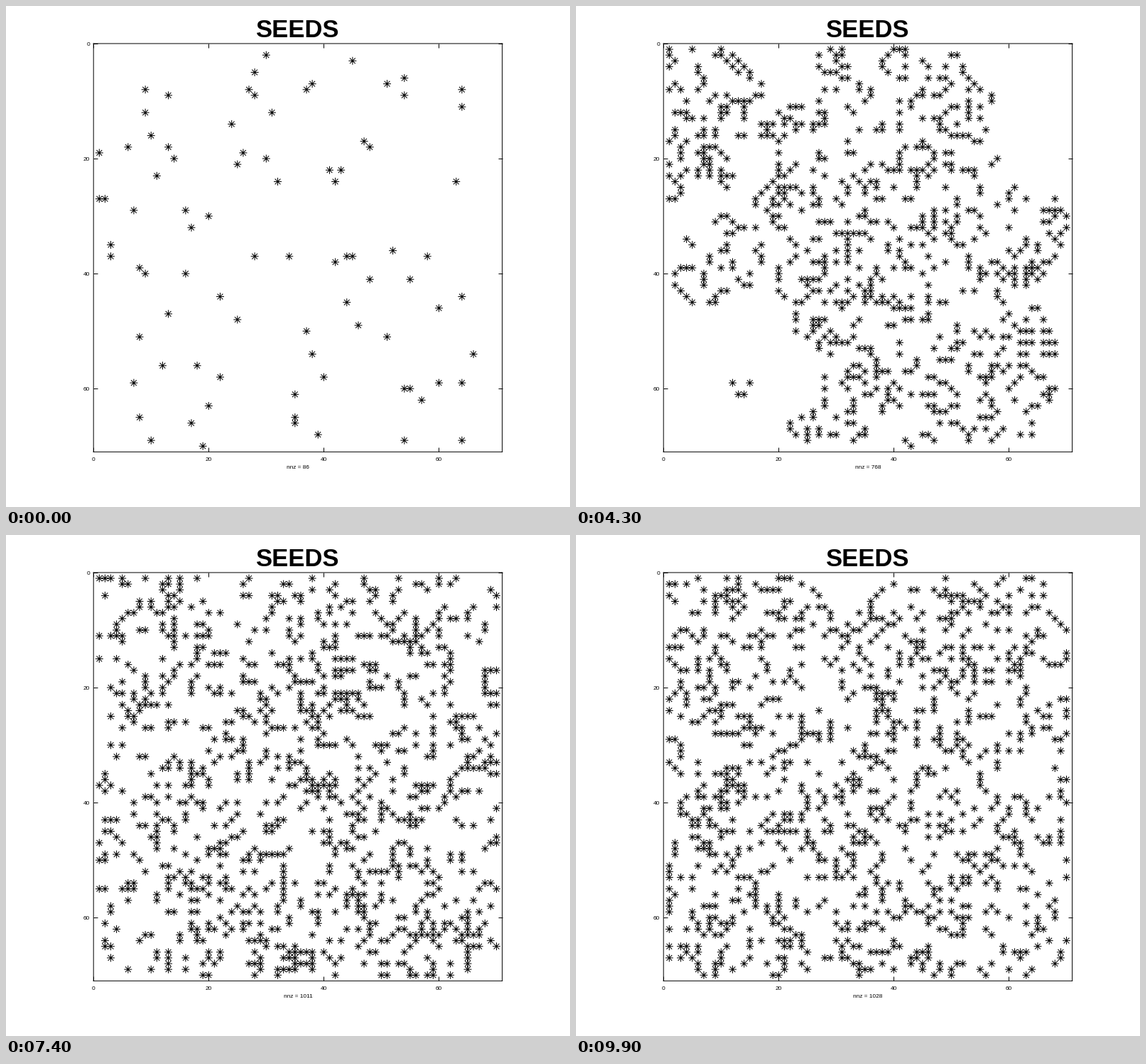
A matplotlib script for the animation above (10000 ms loop, 794 px wide and 706 px high).

```python
import random

import matplotlib.pyplot as plt
import numpy as np
from matplotlib.animation import FuncAnimation

W, H, DPI = 794, 706, 64
N, STEPS, ALIVE = 70, 100, 86

# Square plot box inside the usual 0.13-0.905 by 0.11-0.925 axes area.
SIDE = 0.815 * H
LEFT, TOP = 0.5175 * W - SIDE / 2, 0.075 * H
CELL = SIDE / (N + 1)

# Close groups (column, row) that start the growth; lone cells just die out.
GROUPS = [
    (38, 7), (37, 8), (27, 8), (28, 9), (47, 17), (48, 18), (13, 18), (14, 20),
    (26, 19), (25, 21), (41, 22), (43, 22), (42, 24), (1, 27), (2, 27),
    (3, 35), (3, 37), (44, 37), (45, 37), (42, 38), (8, 39), (9, 40),
    (54, 60), (55, 60), (57, 62), (35, 65), (35, 66),
]


def px(v):
    """Pixels to points."""
    return v * 72 / DPI


def first_board():
    """The groups plus random lone cells, too far apart to interact."""
    rng = random.Random(7)
    cells = list(GROUPS)
    while len(cells) < ALIVE:
        c, r = rng.randint(1, N), rng.randint(1, N)
        if all(max(abs(c - a), abs(r - b)) > 2 for a, b in cells):
            cells.append((c, r))
    board = np.zeros((N, N), int)
    for c, r in cells:
        board[r - 1, c - 1] = 1
    return board


def step(board):
    """Seeds rule: a dead cell with exactly two neighbours is born, all others die."""
    p = np.pad(board, 1)
    near = sum(p[i:i + N, j:j + N] for i in range(3) for j in range(3)) - board
    return ((board == 0) & (near == 2)).astype(int)


boards = [first_board()]
while len(boards) < STEPS:
    boards.append(step(boards[-1]))

plt.rcParams.update({"font.family": "Liberation Sans", "path.simplify": False})
fig = plt.figure(figsize=(W / DPI, H / DPI), dpi=DPI, facecolor="white")


def label(x, y, text, size=8.3, ha="center", **kw):
    return fig.text(x / W, 1 - y / H, text, fontsize=px(size), ha=ha,
                    va="baseline", color="black", **kw)


ax = fig.add_axes([LEFT / W, 1 - (TOP + SIDE) / H, SIDE / W, SIDE / H])
ax.set(xlim=(0, N + 1), ylim=(N + 1, 0))
ticks = range(0, N, 20)
ax.set_xticks(ticks)
ax.set_yticks(ticks)
ax.tick_params(direction="in", length=px(6), width=px(1), top=True, right=True,
               labelleft=False, labelbottom=False)
for spine in ax.spines.values():
    spine.set_linewidth(px(1))
    spine.set_snap(False)

for t in ticks:
    label(LEFT + t * CELL, 641, str(t))
    label(LEFT - 5, TOP + t * CELL + 3, str(t), ha="right")

label(LEFT + SIDE / 2, 44, "SEEDS", size=34.6, weight="bold")
count = label(LEFT + SIDE / 2, 652, "")

# Asterisk: four strokes through the centre, separated by gaps.
angles = np.arange(4) * np.pi / 4
arm = 5.5 / CELL * np.column_stack([np.cos(angles), np.sin(angles)])
star = np.stack([-arm, arm, np.full_like(arm, np.nan)], axis=1).reshape(-1, 2)
marks, = ax.plot([], [], color="black", lw=px(1), snap=False,
                 solid_capstyle="butt", clip_on=False)


def draw(k):
    rows, cols = np.nonzero(boards[k])
    centres = np.column_stack([cols, rows]) + 1
    strokes = (centres[:, None] + star).reshape(-1, 2)
    marks.set_data(strokes[:, 0], strokes[:, 1])
    count.set_text(f"nnz = {len(rows)}")
    return marks, count


anim = FuncAnimation(fig, draw, frames=STEPS, interval=100, repeat=True,
                     repeat_delay=0)
plt.show()
```
